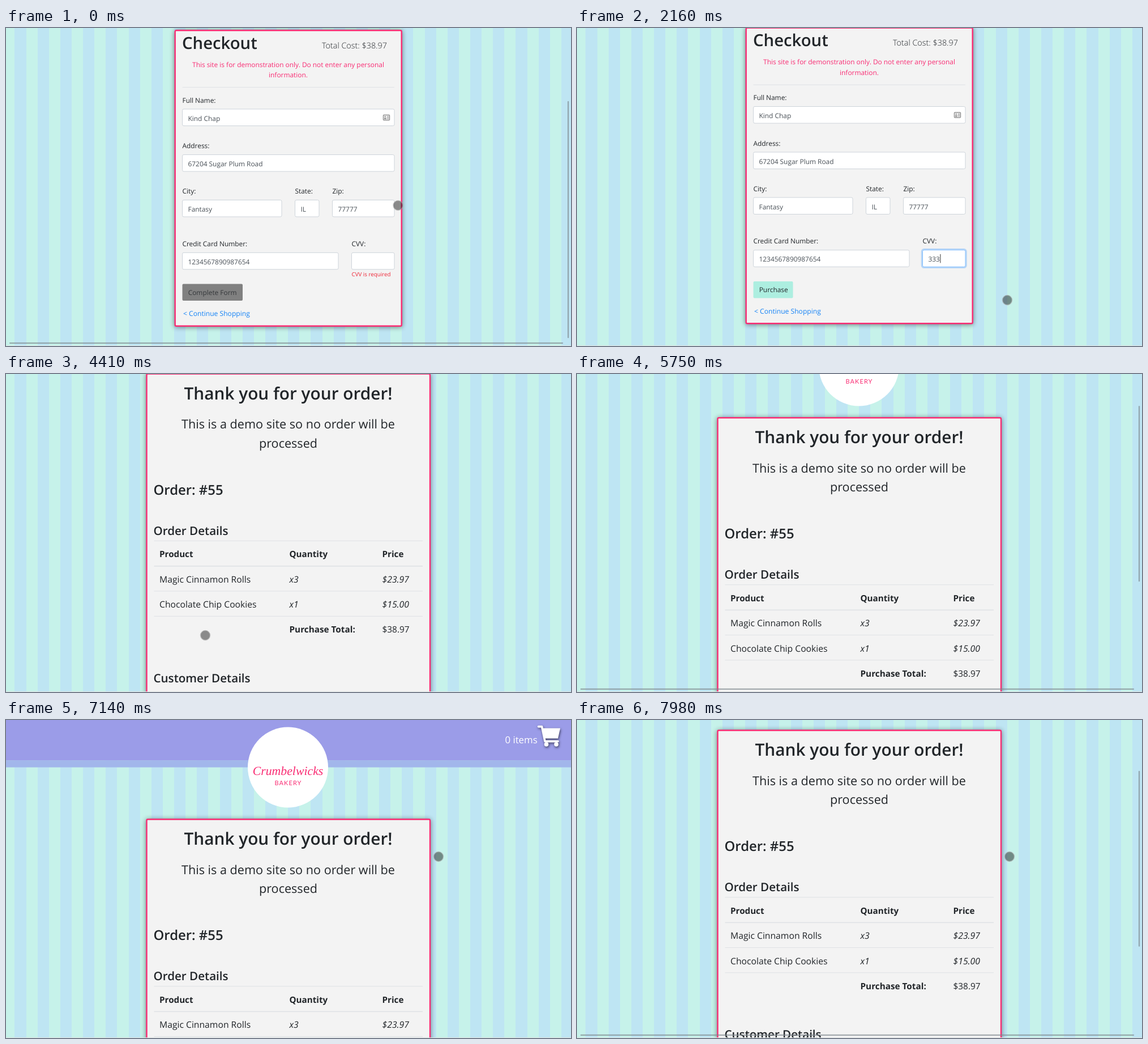
These frames come from a looping animation (998x561 px, 8 s). An HTML page:

```html
<!DOCTYPE html>
<html lang="en">
<head>
<meta charset="utf-8">
<title>Bakery checkout</title>
<style>
  html, body { margin: 0; width: 100%; height: 100%; overflow: hidden; }
  svg {
    display: block; width: 998px; height: 561px;
    background: repeating-linear-gradient(90deg, #c6f2ea 0 20.12px, #bee5f3 20.12px 40.23px) -4.7px 0 / 1010px 100%;
    font: 11.9px "Open Sans", "Noto Sans", sans-serif;
    fill: #212529; text-rendering: geometricPrecision;
  }
  .card { fill: #f3f3f3; stroke: #f92c73; stroke-width: 2.4; filter: drop-shadow(0 1px 4px #0007); }
  .field { fill: #fff; stroke: #ced4da; }
  .rule { fill: #dfe2e5; }
  .value { fill: #495057; }
  .mid { text-anchor: middle; }
  .pink { fill: #f92c73; }
  .semi { font-weight: 600; }
  .bold { font-weight: 700; }
  .italic { font-style: italic; }
  .light { font-weight: 300; }
</style>
</head>
<body>
<svg id="stage" viewBox="0 0 998 561"></svg>
<script>
const LOOP = 8000;
const text = (x, y, str, cls = "", size = 11.9, attrs = "") =>
  `<text x="${x}" y="${y}" class="${cls}" font-size="${size}" ${attrs}>${str}</text>`;
const rect = (x, y, w, h, cls, attrs = "") =>
  `<rect x="${x}" y="${y}" width="${w}" height="${h}" class="${cls}" ${attrs}/>`;
const field = (x, y, w, label, value, id = "") =>
  text(x, y - 11.5, label) +
  rect(x, y, w, 29.5, "field", `rx="2.5" id="${id}Box"`) +
  text(x + 10, y + 20.5, value, "value", 11.9, `id="${id}Text"`);
const row = (y, cells, styles, sizes) =>
  cells.map((c, i) => text([271, 500.5, 664.5][i], y, c, styles[i], sizes[i])).join("");

const checkout = `<g id="checkout">
  ${rect(298.7, -.3, 400, 521.5, "card", 'rx="2"')}
  ${text(311, 32, "Checkout", "semi", 29.3)}
  ${text(558, 31, "Total Cost: $38.97", "light", 14.4)}
  ${text(498.5, 64, "This site is for demonstration only. Do not enter any personal", "pink mid")}
  ${text(498.5, 82.5, "information.", "pink mid")}
  ${rect(311.5, 99.7, 374.5, 1, "rule")}
  ${field(311.5, 138.5, 374.5, "Full Name:", "Kind Chap", "name")}
  <g fill="#8f8f8f">
    <rect x="666.5" y="149" width="11" height="9" rx="1" fill="none" stroke="#8f8f8f" stroke-width="1.4"/>
    <circle cx="669.7" cy="152" r="1.3"/>
    <rect x="668" y="154" width="3.5" height="2.5"/>
    <path d="M672.5 151h4v1h-4zm0 2h4v1h-4zm0 2h4v1h-4z"/>
  </g>
  ${field(311.5, 219, 374.5, "Address:", "67204 Sugar Plum Road", "address")}
  ${field(311.5, 299, 175.5, "City:", "Fantasy", "city")}
  ${field(510.5, 299, 42.5, "State:", "IL", "state")}
  ${field(576.5, 299, 109.5, "Zip:", "77777", "zip")}
  ${field(311.5, 391.8, 275.5, "Credit Card Number:", "1234567890987654", "credit")}
  <rect id="ring" x="609" y="390.3" width="78.5" height="32.5" rx="4" fill="none" stroke="#007bff" stroke-opacity=".25" stroke-width="2.5"/>
  ${field(610.5, 391.8, 75.5, "CVV:", "", "cvv")}
  <rect id="caret" y="399" width="1" height="15.5" fill="#333"/>
  ${text(610.5, 433.5, "CVV is required", "", 9.75, 'id="error" fill="#ee2536"')}
  <rect id="buttonRing" x="310.3" y="445.8" width="72.4" height="32" rx="3.5" fill="none" stroke="#adeee0" stroke-opacity=".6" stroke-width="2.5"/>
  <rect id="button" x="311.5" y="447" height="29.5" rx="2"/>
  ${text(321.7, 466, "", "", 11.9, 'id="buttonText"')}
  ${text(313, 503.5, "&lt; Continue Shopping", "", 12.1, 'fill="#1583f6"')}
</g>`;

const thanks = `<g id="thanks">
  <rect width="998" height="71.5" fill="#9b9ce8"/>
  <rect y="71.5" width="998" height="12" fill="#a2b6eb"/>
  ${text(881.5, 41, "0 items", "", 16.8, 'fill="#fff"')}
  <g fill="#fff" transform="translate(1 -.6)" style="filter:drop-shadow(1px 2px 2px #0009)">
    <path d="M946 15H978L974 33H950Z"/>
    <path d="M939.5 12.2H945.5L951 38.2H974" fill="none" stroke="#fff" stroke-width="3.6" stroke-linecap="round" stroke-linejoin="round"/>
    <circle cx="953.5" cy="43.5" r="3.8"/><circle cx="971" cy="43.5" r="3.8"/>
  </g>
  <circle cx="498" cy="83.5" r="71" fill="#fff"/>
  ${text(498, 97, "Crumbelwicks", "pink mid italic", 21.8, 'font-family="Liberation Serif, serif"')}
  ${text(498.5, 115, "BAKERY", "pink mid", 11, 'font-family="Lato, sans-serif" letter-spacing="1.1"')}
  ${rect(248.5, 175.2, 500.5, 800, "card", 'rx="2"')}
  ${text(498.5, 220, "Thank you for your order!", "semi mid", 29.8)}
  ${text(498.5, 271.5, "This is a demo site so no order will be", "mid", 21.6)}
  ${text(498.5, 305, "processed", "mid", 21.6)}
  ${text(260.5, 388, "Order: #55", "semi", 23.9)}
  ${text(260.5, 459, "Order Details", "semi", 20.6)}
  ${[[469.3, 1], [513.6, 1.6], [558, 1], [602.3, 1]].map(([y, h]) => rect(261.5, y, 474.5, h, "rule")).join("")}
  ${row(498.5, ["Product", "Quantity", "Price"], ["bold", "bold", "bold"], [15.2, 15.2, 15.2])}
  ${row(543, ["Magic Cinnamon Rolls", "x3", "$23.97"], ["", "italic", "italic"], [15.7, 15.8, 15.8])}
  ${row(587.5, ["Chocolate Chip Cookies", "x1", "$15.00"], ["", "italic", "italic"], [15.7, 15.8, 15.8])}
  ${row(631.5, ["", "Purchase Total:", "$38.97"], ["", "bold", ""], [15.7, 15.3, 15.4])}
  ${text(260.5, 719, "Customer Details", "semi", 20.6)}
</g>`;

const overlay = `
  <g id="bars" fill="#7b858b" fill-opacity=".65">
    <rect x="6" y="554.7" width="978" height="2.3" rx="1"/>
    <rect id="thumb" x="991.9" width="2.3" rx="1"/>
  </g>
  <rect y="560" width="998" height="1" fill="#dde3e3"/>
  <circle id="cursor" r="8.4" fill="#000" fill-opacity=".43" stroke="#aaa" stroke-opacity=".5" stroke-width="1.8"/>`;

document.getElementById("stage").innerHTML = checkout + thanks + overlay;
const $ = id => document.getElementById(id);
const set = (id, attrs) => { for (const k in attrs) $(id).setAttribute(k, attrs[k]); };
const show = (id, on) => $(id).style.display = on ? "" : "none";

// Progress 0..1 in n jumps, the first at t0 and the last at t1
const step = (t, t0, t1, n) => {
  const gap = n > 1 ? (t1 - t0) / (n - 1) : 1;
  return Math.min(n, Math.max(0, Math.floor((t - t0) / gap + 1e-6) + 1)) / n;
};

const moves = [ // start, end, jumps, x, y
  [120, 970, 7, 654, 410],
  [1510, 1760, 3, 760, 480],
  [2290, 2290, 1, 770, 480],
  [2420, 2550, 2, 352, 461],
  [7005, 7140, 2, 764, 241]
];

function draw(t) {
  const ordered = t >= 4410;
  const scroll = 175.5 - 77.5 * step(t, 5370, 5750, 4) - 78 * step(t, 6060, 6480, 4)
    - 20 * step(t, 6870, 6870, 1) + 157 * step(t, 7710, 7980, 3);
  show("checkout", !ordered);
  show("thanks", ordered);
  set("checkout", { transform: `translate(0 ${4.5 * (1 - step(t, 120, 260, 2))})` });
  set("thanks", { transform: `translate(0 ${-scroll})` });

  const focus = t >= 830 && t < 3630;
  const digits = [1220, 1510, 2160].filter(at => t >= at).length;
  const ready = digits === 3;
  $("cvvText").textContent = "3".repeat(digits);
  $("cvvBox").style.stroke = focus ? "#80bdff" : "";
  show("ring", focus);
  show("caret", focus && t < 3080);
  set("caret", { x: 620.7 + digits * 6.9 });
  show("error", digits === 0);
  set("button", { width: ready ? 70 : 106.5, fill: ready ? "#adeee0" : "#808080" });
  set("buttonText", { fill: ready ? "#212529" : "#34373a" });
  $("buttonText").textContent = ready ? "Purchase" : "Complete Form";
  show("buttonRing", t >= 3630);

  show("bars", t < 690 || (t >= 5370 && t < 7005) || t >= 7710);
  set("thumb", ordered ? { y: .6 + .568 * scroll, height: 310 } : { y: 129, height: 418 });

  let x = 692.5, y = 313;
  for (const [t0, t1, n, toX, toY] of moves) {
    const p = step(t, t0, t1, n);
    x += (toX - x) * p;
    y += (toY - y) * p;
  }
  set("cursor", { cx: x, cy: y });
  show("cursor", t < 3080 || (t >= 3630 && t < 4970) || t >= 7005);
}

function tick() {
  draw(performance.now() % LOOP);
  requestAnimationFrame(tick);
}
tick();
</script>
</body>
</html>
```
